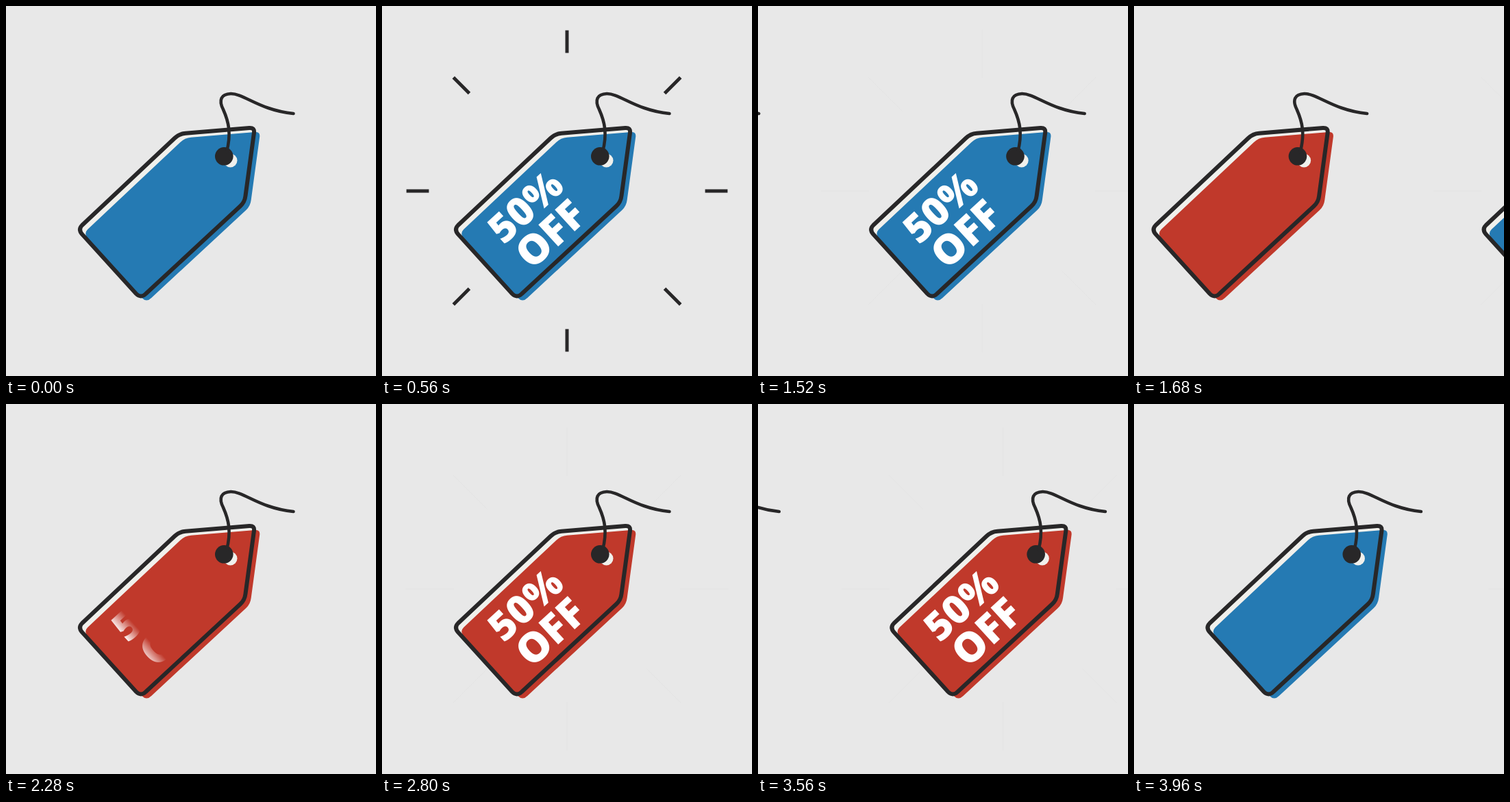
Write an HTML page that moves like this. It is 540x540 px and loops after 4 s.

```html
<!DOCTYPE html>
<html lang="en">
<head>
<meta charset="utf-8">
<title>Sale tags</title>
<style>
  html, body { margin: 0; width: 100%; height: 100%; overflow: hidden; background: #e8e8e8; }
  svg { display: block; width: 100vw; height: 100vh; }
  text { font: 800 58px "Open Sans", "Noto Sans", sans-serif; fill: #fff; text-anchor: middle; }
  .large { font-size: 60px; }
  .ink { fill: none; stroke: #282728; stroke-linecap: round; stroke-linejoin: round; }
  .rays { fill: none; stroke: #282728; stroke-width: 5; }
  .hair { fill: none; stroke: #282728; stroke-width: 1; opacity: .02; }
</style>
</head>
<body>
<svg id="stage" viewBox="0 0 540 540">
  <defs>
    <path id="body" d="M262 185.7L355 178Q363 177.4 362 185L349.5 277Q348.5 286 342 292L204 420Q197 427 190 420L111 333Q105 326 111 320L246 193Q253 186.3 262 185.7Z"/>
  </defs>
</svg>
<script>
const HALF = 2000, INNER = 165, OUTER = 235.5;
const FEATHER = 25, WIPE_FROM = -106, WIPE_TO = 50;
const EXIT = 483.5, ENTER = 474.4;
const stage = document.getElementById('stage');

const clamp = v => Math.min(1, Math.max(0, v));
const span = (t, from, to) => clamp((t - from) / (to - from));
const mix = (a, b, p) => a + (b - a) * p;
const easeOut = p => 1 - (1 - p) ** 2;

// cubic-bezier(x1, 0, x2, 1), solved by bisection
function bezier(x1, x2, x) {
  let lo = 0, hi = 1;
  for (let i = 0; i < 30; i++) {
    const s = (lo + hi) / 2, r = 1 - s;
    if (3 * x1 * s * r * r + 3 * x2 * s * s * r + s ** 3 < x) lo = s; else hi = s;
  }
  return lo * lo * (3 - 2 * lo);
}

function rays(from, to) {
  if (to - from < .1) return '';
  let d = '';
  for (let i = 0; i < 8; i++) {
    const c = Math.cos(i * Math.PI / 4), s = Math.sin(i * Math.PI / 4);
    const at = r => `${(270 + r * c).toFixed(2)} ${(270 + r * s).toFixed(2)}`;
    d += `M${at(from)}L${at(to)}`;
  }
  return d;
}

function makeTag(color, id) {
  const g = document.createElementNS('http://www.w3.org/2000/svg', 'g');
  g.innerHTML = `
    <linearGradient id="edge${id}" gradientUnits="userSpaceOnUse" y1="0" y2="0">
      <stop offset="0" stop-color="#fff"/><stop offset="1" stop-color="#fff" stop-opacity="0"/>
    </linearGradient>
    <mask id="wipe${id}" maskUnits="userSpaceOnUse" x="-200" y="300" width="400" height="200">
      <rect x="-200" y="300" width="400" height="200" fill="url(#edge${id})"/>
    </mask>
    <path class="hair" d="${rays(INNER, OUTER)}"/>
    <path class="rays"/>
    <use href="#body" fill="#f0f0ec"/>
    <use href="#body" x="8.2" y="6" fill="${color}"/>
    <circle cx="327.5" cy="225.5" r="10" fill="#f0f0ec"/>
    <g transform="rotate(-42.5)"><g mask="url(#wipe${id})">
      <text x="-43.5" y="377.8">50%</text><text class="large" x="-43.5" y="432.4">OFF</text>
    </g></g>
    <use href="#body" class="ink" stroke-width="6"/>
    <circle cx="318.3" cy="219.3" r="13.3" fill="#282728"/>
    <path class="ink" stroke-width="4.6" d="M322 213C329 186 325 169 317 151C310 137 314 128.5 328 128C347 127.5 370 152 419.5 157"/>`;
  stage.append(g);
  const edge = g.querySelector('linearGradient');
  const burst = g.querySelector('.rays');
  const hair = g.querySelector('.hair');
  return {
    pose(x, t) {
      const front = mix(WIPE_FROM, WIPE_TO, easeOut(span(t, 245, 640)));
      g.setAttribute('transform', `translate(${x.toFixed(2)} 0)`);
      edge.setAttribute('x1', front - FEATHER);
      edge.setAttribute('x2', front);
      burst.setAttribute('d', rays(
        mix(INNER, OUTER, easeOut(span(t, 460, 790))),
        mix(INNER, OUTER, easeOut(span(t, 290, 600)))));
      hair.style.display = t > 600 ? '' : 'none';
    }
  };
}

const tags = [makeTag('#257ab3', 'A'), makeTag('#c0392b', 'B')];

function draw(now) {
  const time = now % (2 * HALF), half = time < HALF ? 0 : 1, t = time % HALF;
  const p = bezier(.952, .124, span(t, 1200, 2000));
  tags[half].pose(EXIT * p, t);
  tags[1 - half].pose(t < 1200 ? -600 : -ENTER * (1 - p), 0);
}

const start = performance.now();
function loop() {
  draw(performance.now() - start);
  requestAnimationFrame(loop);
}
loop();
</script>
</body>
</html>
```
